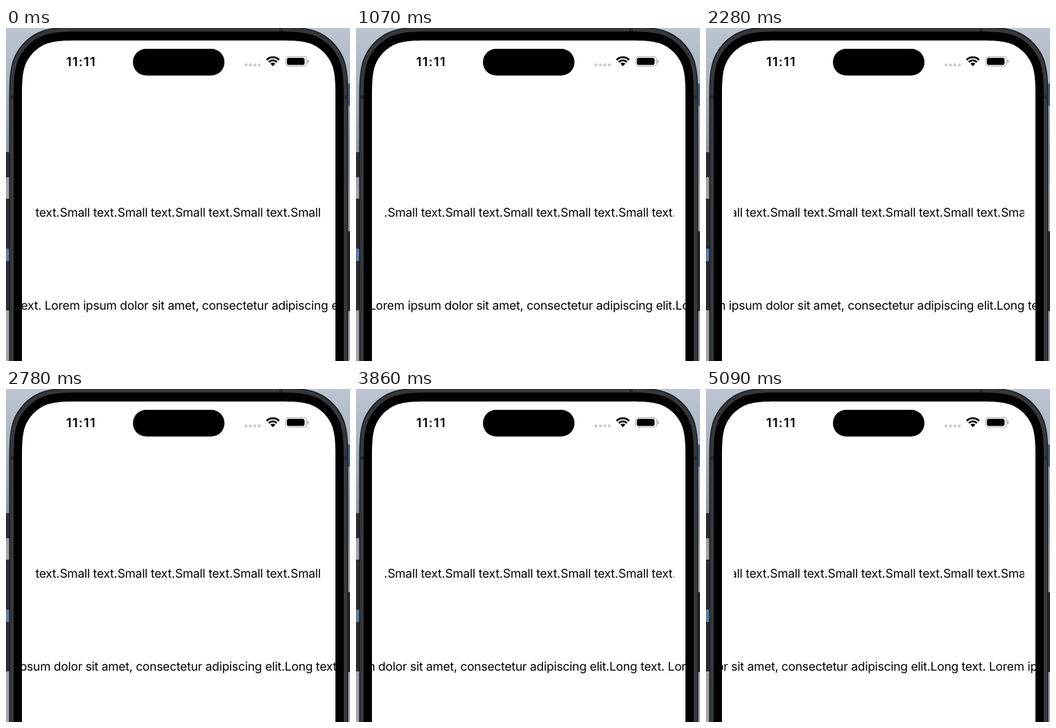
An HTML page with a canvas that plays this animation: 496x480 px, repeating every 5.14 s.

```html
<!DOCTYPE html>
<html lang="en">
<head>
<meta charset="utf-8">
<title>Marquee</title>
<style>
  html, body { margin: 0; width: 100%; height: 100%; overflow: hidden; background: #8e99a8; }
  canvas { display: block; }
</style>
</head>
<body>
<canvas id="stage" width="496" height="480"></canvas>
<script>
const ctx = document.getElementById('stage').getContext('2d');
const LOOP = 5140;
const STEP = 71.65;   // the picture advances about 14 times a second
const FONT = 'Inter, "Noto Sans", sans-serif';

// start: origin of the first repeat; speed: pixels per step
const marquees = [
  { text: 'Small text.', start: -5.7, period: 83.2, speed: 2.135, baseline: 271.5, left: 40, right: 458.5 },
  { text: 'Long text. Lorem ipsum dolor sit amet, consectetur adipiscing elit.',
    start: -28.7, period: 526, speed: 2.447, baseline: 405.7, left: 23, right: 475 }
];

function rect(x, y, w, h, color) {
  ctx.fillStyle = color;
  ctx.fillRect(x, y, w, h);
}

function round(x, y, w, h, r, color) {
  ctx.fillStyle = color;
  ctx.beginPath();
  ctx.roundRect(x, y, w, h, r);
  ctx.fill();
}

// A panel running off the bottom, with smooth-curvature top corners.
function panel(left, top, right, r, color) {
  const a = 1.529 * r, b = 1.088 * r, c = 0.868 * r, d = 0.631 * r;
  const e = 0.373 * r, f = 0.169 * r, g = 0.075 * r;
  ctx.fillStyle = color;
  ctx.beginPath();
  ctx.moveTo(left, 500);
  ctx.lineTo(left, top + a);
  ctx.bezierCurveTo(left, top + b, left, top + c, left + g, top + d);
  ctx.bezierCurveTo(left + f, top + e, left + e, top + f, left + d, top + g);
  ctx.bezierCurveTo(left + c, top, left + b, top, left + a, top);
  ctx.lineTo(right - a, top);
  ctx.bezierCurveTo(right - b, top, right - c, top, right - d, top + g);
  ctx.bezierCurveTo(right - e, top + f, right - f, top + e, right - g, top + d);
  ctx.bezierCurveTo(right, top + c, right, top + b, right, top + a);
  ctx.lineTo(right, 500);
  ctx.fill();
}

function drawBackdrop() {
  const sky = ctx.createLinearGradient(0, 0, 0, 480);
  sky.addColorStop(0, '#bcc6d1');
  sky.addColorStop(0.2, '#a5b0be');
  sky.addColorStop(0.37, '#8c97a6');
  sky.addColorStop(0.5, '#a3a5a9');
  sky.addColorStop(1, '#a2a5ab');
  rect(0, 0, 496, 480, sky);
  rect(0, 318, 8, 18, '#5c80a6');
  rect(490, 80, 6, 32, '#46618a');

  // side buttons
  for (const [y, h] of [[179, 36], [246, 72], [336, 71]]) rect(0, y, 8, h, '#2b2d31');
  rect(490, 293, 6, 115, '#25272a');
}

function drawBody() {
  panel(4.5, -2, 493.5, 76, '#1b1d1f');
  panel(6, -0.5, 492, 75, '#36393b');
  rect(394, 0, 5, 5, '#25272a');
  rect(5, 97, 6, 5, '#25272a');
  rect(488, 97, 5, 5, '#25272a');
  panel(11, 5, 487, 70, '#000');
  panel(23, 18, 475, 58, '#fff');
}

function drawWifi() {
  const x = 384.8, y = 55;
  ctx.save();
  ctx.beginPath();
  ctx.moveTo(x, y);
  ctx.arc(x, y, 14.5, -Math.PI * 0.75, -Math.PI * 0.25);
  ctx.closePath();
  ctx.clip();
  ctx.strokeStyle = '#000';
  ctx.lineWidth = 2.7;
  for (const r of [12.8, 8.3]) {
    ctx.beginPath();
    ctx.arc(x, y, r, -Math.PI, 0);
    ctx.stroke();
  }
  ctx.fillStyle = '#000';
  ctx.beginPath();
  ctx.arc(x, y, 5, -Math.PI, 0);
  ctx.fill();
  ctx.restore();
}

function drawStatusBar() {
  round(183, 30, 132, 38.5, 19.2, '#000');

  ctx.font = `600 18.2px ${FONT}`;
  ctx.letterSpacing = '1.3px';
  ctx.textAlign = 'center';
  ctx.fillStyle = '#000';
  ctx.fillText('11:11', 108.4, 55);

  for (let i = 0; i < 4; i++) round(344 + i * 6.4, 51.3, 4, 4, 1, '#cbcbcb');
  drawWifi();

  ctx.strokeStyle = '#a3a3a3';
  ctx.lineWidth = 1.1;
  ctx.beginPath();
  ctx.roundRect(403.2, 41.2, 30.6, 13.8, 4.5);
  ctx.stroke();
  round(405, 43, 25.5, 10.2, 2.8, '#000');
  round(434.8, 45.8, 1.6, 4.6, [0, 1.6, 1.6, 0], '#a3a3a3');
}

function drawMarquee(m, step) {
  ctx.save();
  ctx.beginPath();
  ctx.rect(m.left, m.baseline - 24, m.right - m.left, 36);
  ctx.clip();
  ctx.font = `400 17.4px ${FONT}`;
  ctx.letterSpacing = '-0.22px';
  ctx.textAlign = 'left';
  ctx.fillStyle = '#000';
  for (let x = m.start - step * m.speed; x < m.right; x += m.period) {
    ctx.fillText(m.text, x, m.baseline);
  }
  ctx.restore();
}

function draw() {
  const time = performance.now() % LOOP;
  const step = Math.floor((time + 17) / STEP);
  drawBackdrop();
  drawBody();
  drawStatusBar();
  for (const m of marquees) drawMarquee(m, step);
  requestAnimationFrame(draw);
}

ctx.textRendering = 'geometricPrecision';
draw();
</script>
</body>
</html>
```
